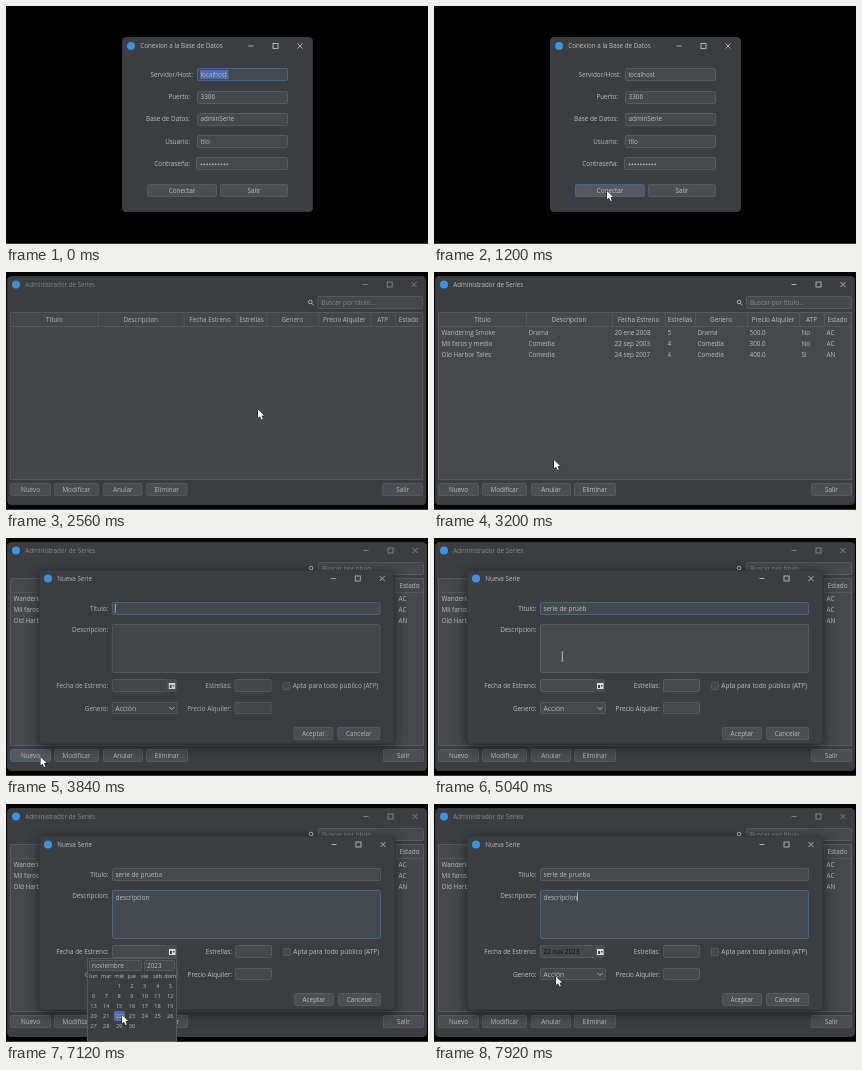
An HTML page with a canvas for the animation above (8 s loop, 422 px wide and 238 px high).

```html
<!DOCTYPE html>
<html lang="es">
<head>
<meta charset="utf-8">
<title>Administrador de Series</title>
<style>
html, body { margin: 0; width: 100%; height: 100%; overflow: hidden; background: #000; }
canvas { display: block; width: 100vw; height: 100vh; }
</style>
</head>
<body>
<canvas id="stage" width="422" height="238"></canvas>
<script>
const LOOP = 8000, STEP = 80;
const ctx = document.getElementById('stage').getContext('2d');
const BG = '#3c3e41', FIELD = '#46484b', LINE = '#57595c', EDGE = '#36383a';
const FOCUS = '#46658a', FOCUS_FIELD = '#454a50';
const TEXT = '#bbbbbb', DIM = '#88898b', BUTTON = '#4c4f52', HOVER = '#565a5d';

const clamp = v => Math.max(0, Math.min(1, v));

function text(s, x, y, { color = TEXT, size = 6.35, align = 'left', weight = '' } = {}) {
  ctx.font = `${weight} ${size}px "Open Sans", "Noto Sans", sans-serif`;
  ctx.textAlign = align;
  ctx.fillStyle = color;
  ctx.fillText(s, x, y + 2.2);
  return ctx.measureText(s).width;
}

function box(x, y, x2, y2, fill = FIELD, stroke = LINE, r = 1) {
  ctx.beginPath();
  ctx.roundRect(x + .5, y + .5, x2 - x - 1, y2 - y - 1, r);
  ctx.fillStyle = fill;
  ctx.fill();
  ctx.strokeStyle = stroke;
  ctx.lineWidth = 1;
  ctx.stroke();
}

function field(x, y, x2, y2, focused) {
  box(x, y, x2, y2, focused ? FOCUS_FIELD : FIELD, focused ? FOCUS : LINE);
}

function line(color, ...p) {
  ctx.beginPath();
  for (let i = 0; i < p.length; i += 2) ctx.lineTo(p[i], p[i + 1]);
  ctx.strokeStyle = color;
  ctx.lineWidth = .9;
  ctx.stroke();
}

function dot(x, y, r, color) {
  ctx.beginPath();
  ctx.arc(x, y, r, 0, 7);
  ctx.fillStyle = color;
  ctx.fill();
}

function button(label, x, y, x2, y2, fill = BUTTON, stroke = LINE) {
  box(x, y, x2, y2, fill, stroke);
  text(label, (x + x2) / 2, (y + y2) / 2, { align: 'center' });
}

function cross(x, y, color) {
  line(color, x - 2.5, y - 2.5, x + 2.5, y + 2.5);
  line(color, x + 2.5, y - 2.5, x - 2.5, y + 2.5);
}

function panel(x, y, x2, y2, shadow) {
  ctx.save();
  ctx.shadowColor = 'rgba(0,0,0,.55)';
  ctx.shadowBlur = shadow;
  ctx.shadowOffsetY = shadow / 4;
  box(x, y, x2, y2, BG, BG, 4);
  ctx.restore();
  box(x, y, x2, y2, BG, EDGE, 4);
}

function titleBar(title, logoX, y, right, active) {
  const color = active ? TEXT : DIM;
  dot(logoX, y, 4, '#3d94de');
  text(title, logoX + 9.3, y, { color, size: 6.25 });
  line(color, right - 51.5, y, right - 46.5, y);
  ctx.strokeRect(right - 27, y - 2.5, 5, 5);
  cross(right, y, color);
}

// Window opening: quick fade while the width settles from the left edge
function opening(t, start, left, draw) {
  if (t < start) return;
  const rest = (1 - clamp((t - start) / 120)) ** 3;
  ctx.save();
  ctx.globalAlpha = 1 - rest;
  ctx.translate(left, 0);
  ctx.scale(1 - .03 * rest, 1);
  ctx.translate(-left, 0);
  draw(t);
  ctx.restore();
}

const typed = (s, t, from, to) => s.slice(0, Math.round(s.length * clamp((t - from) / (to - from))));

function caret(t, x, y) {
  if ((t - 3540) % 1000 < 500) line(TEXT, x + .5, y - 4.5, x + .5, y + 4.5);
}

function login(t) {
  const clicked = t >= 1040;
  panel(116, 31, 307, 206, 0);
  titleBar('Conexion a la Base de Datos', 125, 40, 294, t < 1600);
  const rows = [['Servidor/Host:', 'localhost'], ['Puerto:', '3306'], ['Base de Datos:', 'adminSerie'],
    ['Usuario:', 'tilo'], ['Contraseña:', '']];
  rows.forEach(([label, value], i) => {
    const y = 68.5 + i * 22.3, top = Math.round(y - 6.3), focused = !i && !clicked;
    text(label, i ? 184 : 187, y, { align: 'right' });
    field(i < 4 ? 191 : 190, top, 282, top + 13, focused);
    if (focused) {
      ctx.fillStyle = '#4b6eaf';
      ctx.fillRect(194, 64, 28.5, 9);
    }
    text(value, 194.5, y);
  });
  for (let i = 0; i < 10; i++) dot(195.5 + i * 2.85, 158.3, .85, TEXT);
  button('Conectar', 141, 178, 211, 191, t >= 800 && t < 1840 ? HOVER : BUTTON, clicked ? FOCUS : LINE);
  button('Salir', 214, 178, 282, 191);
}

function message(t) {
  panel(137, 84, 285, 152, 12);
  text('Message', 142, 93);
  cross(272, 93, TEXT);
  dot(153, 117, 8, '#3592c4');
  ctx.fillStyle = BG;
  ctx.fillRect(152, 115.5, 2, 6);
  dot(153, 112.8, 1.2, BG);
  text('Conexion exitosa.', 171, 116.5);
  box(237, 132, 278, 145, t >= 2240 ? '#3c618c' : '#365880', '#4c708c');
  text('OK', 258, 138.7, { align: 'center', weight: 'bold' });
}

const COLUMNS = [['Titulo', 5], ['Descripcion', 92], ['Fecha Estreno', 178], ['Estrellas', 231],
  ['Genero', 261], ['Precio Alquiler', 313], ['ATP', 365], ['Estado', 390], ['', 417]];
const SERIES = [
  ['Wandering Smoke', 'Drama', '20 ene 2008', '5', 'Drama', '500.0', 'No', 'AC'],
  ['Mil faros y medio', 'Comedia', '22 sep 2003', '4', 'Comedia', '300.0', 'No', 'AC'],
  ['Old Harbor Tales', 'Comedia', '24 sep 2007', '4', 'Comedia', '400.0', 'Si', 'AN']];

function mainWindow(t) {
  panel(1, 4, 421, 233, 0);
  titleBar('Administrador de Series', 10, 12.5, 409, t >= 2640 && t < 3770);
  ctx.beginPath();
  ctx.arc(305, 30, 1.8, 0, 7);
  ctx.strokeStyle = TEXT;
  ctx.stroke();
  line(TEXT, 306.3, 31.3, 308.5, 33.5);
  field(312, 24, 418, 37);
  text('Buscar por titulo...', 316, 31, { color: DIM });
  box(4, 40, 418, 208, FIELD, LINE, 0);
  line(LINE, 5, 54.5, 417, 54.5);
  COLUMNS.slice(0, -1).forEach(([name, x], i) => {
    text(name, (x + COLUMNS[i + 1][1]) / 2, 48, { align: 'center' });
    if (i) line(LINE, x + .5, 41, x + .5, 54);
    if (t >= 2640) SERIES.forEach((row, j) => text(row[i], x + 2.5, 60.5 + j * 11.2));
  });
  const hot = t >= 3440 && t < 3920;
  button('Nuevo', 4, 211, 45, 224, hot ? HOVER : BUTTON, t >= 3600 && hot ? FOCUS : LINE);
  button('Modificar', 48, 211, 93, 224);
  button('Anular', 97, 211, 137, 224);
  button('Eliminar', 140, 211, 182, 224);
  button('Salir', 377, 211, 418, 224);
}

function newSeries(t) {
  const inDescription = t >= 5280;
  const label = (s, x, y) => text(s, x, y, { align: 'right' });
  panel(33, 32, 389, 206, 12);
  titleBar('Nueva Serie', 42, 40.5, 377, true);

  label('Titulo:', 102.5, 71);
  field(106, 64, 375, 77, !inDescription);
  const titleWidth = text(typed('serie de prueba', t, 4280, 5120), 109.5, 71);
  if (!inDescription) caret(t, 109 + titleWidth, 70.5);

  label('Descripcion:', 102.5, 91.5);
  field(106, 86, 375, 135, inDescription);
  const descWidth = text(typed('descripcion', t, 5440, 6160), 109.5, 93.3);
  if (inDescription) caret(t, 109 + descWidth, 93);

  label('Fecha de Estreno:', 102.5, 148);
  field(106, 141, 162, 154);
  if (t >= 7440) text('22 nov 2023', 109.5, 148, { color: '#101010' });
  box(161, 141, 171, 154, BUTTON, BUTTON);
  ctx.fillStyle = '#dddddd';
  ctx.fillRect(163, 145, 6.5, 6);
  ctx.fillStyle = '#444';
  ctx.fillRect(164, 147, 2, 3);
  ctx.fillRect(167, 147, 1.5, 1.5);

  label('Estrellas:', 226, 148);
  field(229, 141, 266, 154);
  box(277, 144, 285, 152);
  text('Apta para todo público (ATP)', 287.3, 148, { size: 6.5 });

  label('Genero:', 102.5, 170.3);
  field(106, 164, 172, 176);
  text('Acción', 109.5, 170.3, { size: 6.8 });
  line(TEXT, 163.5, 169, 166, 171.5, 168.5, 169);
  label('Precio Alquiler:', 226, 170.3);
  field(229, 164, 266, 176);
  button('Aceptar', 288, 189, 328, 202);
  button('Cancelar', 332, 189, 375, 202);

  if (t >= 6800 && t < 7440) calendar();
}

function calendar() {
  const cell = (s, col, y) => text(s, 87.5 + col * 12.8, y, { align: 'center', size: 5.6 });
  box(81, 154, 171, 238, BG, LINE, 0);
  box(83, 156, 136, 167);
  text('noviembre', 86, 161.5);
  box(138, 156, 169, 167);
  text('2023', 141, 161.5);
  box(108, 207, 119, 217, '#4b6eaf', '#4b6eaf');
  ['lun', 'mar', 'mié', 'jue', 'vie', 'sáb', 'dom'].forEach((d, i) => cell(d, i, 172));
  for (let d = 1; d <= 30; d++) cell(d, (d + 1) % 7, 182 + Math.floor((d + 1) / 7) * 10);
}

// Pointer stops: time, x, y
const PATH = [[0, 434, 150], [80, 411, 152], [480, 280, 178], [880, 176, 188], [1200, 173, 185],
  [1600, 173, 185], [2320, 252, 137.5], [2640, 252, 137.5], [3040, 120, 188], [3200, 120, 188],
  [3520, 34.5, 219], [3840, 34.5, 219], [4000, 366, 136], [4320, 366, 136], [5120, 121.5, 118],
  [6320, 121.5, 118], [6640, 166, 148], [6800, 166, 148], [7120, 116, 211], [7440, 114, 211],
  [7840, 122, 172.5], [8000, 122, 172.5]];

function pointer(t) {
  const i = PATH.findIndex(p => p[0] > t), [t0, x0, y0] = PATH[i - 1], [t1, x1, y1] = PATH[i];
  const p = (t - t0) / (t1 - t0), k = p * p * (3 - 2 * p);
  const x = x0 + (x1 - x0) * k, y = y0 + (y1 - y0) * k;
  const overText = t >= 3840 && x > 106 && x < 375 && (y > 64 && y < 77 || y > 86 && y < 135);
  if (overText) {
    line('#c4c4c4', x, y - 4, x, y + 4);
    for (const e of [-4.5, 4.5]) line('#a8a8a8', x - 1.5, y + e, x + 1.5, y + e);
    return;
  }
  const shape = [0, 0, 0, 8.6, 2, 6.8, 3.5, 10, 4.9, 9.4, 3.5, 6.3, 6.1, 6.1];
  ctx.beginPath();
  for (let j = 0; j < shape.length; j += 2) ctx.lineTo(x + shape[j], y + shape[j + 1]);
  ctx.closePath();
  ctx.strokeStyle = '#111';
  ctx.lineWidth = 1;
  ctx.stroke();
  ctx.fillStyle = '#fff';
  ctx.fill();
}

function draw(t) {
  ctx.fillStyle = '#000';
  ctx.fillRect(0, 0, 422, 238);
  ctx.fillStyle = '#383838';
  ctx.fillRect(0, 237, 422, 1);
  if (t < 2560) {
    login(t);
    opening(t, 1570, 137, message);
  } else {
    opening(t, 2490, 1, mainWindow);
    opening(t, 3770, 33, newSeries);
  }
  pointer(t);
}

function frame(now) {
  draw(Math.floor(now % LOOP / STEP) * STEP);
  requestAnimationFrame(frame);
}
requestAnimationFrame(frame);
</script>
</body>
</html>
```
